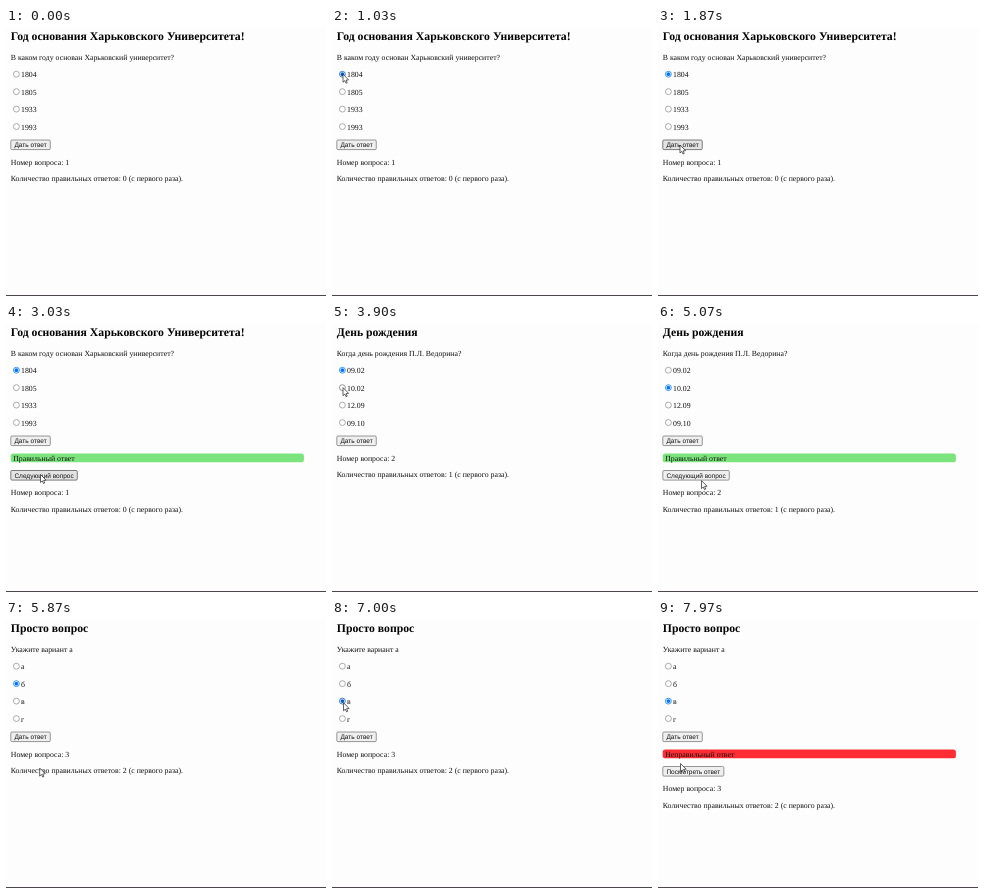
An HTML page with a canvas for the animation above (8 s loop, 320 px wide and 268 px high).

```html
<!DOCTYPE html>
<html lang="ru">
<head>
<meta charset="utf-8">
<title>Тест</title>
<style>
  html, body { margin: 0; width: 100%; height: 100%; overflow: hidden; background: #fefdfe; }
  canvas { display: block; width: 320px; height: 268px; }
</style>
</head>
<body>
<canvas id="stage" width="320" height="268"></canvas>
<script>
const ctx = document.getElementById('stage').getContext('2d');
const LOOP = 8000;
const SCALE = 0.488;
const SERIF = '"Liberation Serif", "Times New Roman", serif';
const SANS = '"Liberation Sans", Arial, sans-serif';
const BODY = `${16 * SCALE}px ${SERIF}`;
const HEADING = `bold ${24 * SCALE}px ${SERIF}`;
const LABEL = `${13.333 * SCALE}px ${SANS}`;
const LEFT = 4.8;
const RADIO_X = 10.4;
const rowY = i => 46.2 + i * 17.45;

const RIGHT = { text: 'Правильный ответ', color: '#7ce47c', next: 'Следующий вопрос' };
const WRONG = { text: 'Неправильный ответ', color: '#ff2c33', next: 'Посмотреть ответ' };

const questions = [
  { title: 'Год основания Харьковского Университета!',
    text: 'В каком году основан Харьковский университет?',
    options: ['1804', '1805', '1933', '1993'], result: RIGHT },
  { title: 'День рождения',
    text: 'Когда день рождения П.Л. Ведорина?',
    options: ['09.02', '10.02', '12.09', '09.10'], result: RIGHT },
  { title: 'Просто вопрос',
    text: 'Укажите вариант а',
    options: ['а', 'б', 'в', 'г'], result: WRONG }
];

// Each step: when it happens, where the pointer is, and what it changes.
const pick = (at, i) => ({ at, x: 11, y: rowY(i), change: { chosen: i } });
const answer = at => ({ at, x: 22, y: 117, change: { answered: true } });
const next = (at, index) => ({ at, x: 34.5, y: 150.5, change: { index, answered: false } });
const rest = (at, x, y) => ({ at, x, y, change: {} });

const steps = [
  rest(0, 221, 268),
  pick(1000, 0), answer(2070), next(3230, 1),
  pick(4070, 1), answer(4670), rest(5270, 43.5, 156.6), next(5600, 2),
  pick(6870, 2), answer(7670), rest(8150, 22.5, 143.5)
];

const SETTLE = 200, LEAVE = 60, TRAVEL = 900;

function pointerAt(t) {
  if (t < 70) return null;
  const i = steps.findIndex(s => s.at > t);
  const from = steps[i - 1], to = steps[i];
  const end = to.at - SETTLE;
  const start = Math.max(from.at + LEAVE, end - TRAVEL);
  const k = Math.min(1, Math.max(0, (t - start) / (end - start)));
  const e = k * k * (3 - 2 * k);
  return [from.x + (to.x - from.x) * e, from.y + (to.y - from.y) * e];
}

function stateAt(t) {
  const done = steps.filter(s => s.at <= t).map(s => s.change);
  return Object.assign({ index: 0, chosen: -1, answered: false }, ...done);
}

function write(text, x, y, font = BODY, color = '#111') {
  ctx.font = font;
  ctx.fillStyle = color;
  ctx.fillText(text, x, y);
}

function circle(x, y, r) {
  ctx.beginPath();
  ctx.arc(x, y, r, 0, Math.PI * 2);
}

function box(x, y, w, h, r) {
  ctx.beginPath();
  ctx.roundRect(x, y, w, h, r);
}

function paint(fill, stroke, width) {
  ctx.fillStyle = fill;
  ctx.fill();
  ctx.lineWidth = width;
  ctx.strokeStyle = stroke;
  ctx.stroke();
}

function radio(y, checked, pointer) {
  const hover = pointer && Math.hypot(pointer[0] - RADIO_X, pointer[1] - y) < 3.4;
  const color = checked ? (hover ? '#005cc8' : '#0075ff') : (hover ? '#4f4f4f' : '#767676');
  circle(RADIO_X, y, 2.95);
  paint('#fff', color, checked ? 0.75 : 0.6);
  if (checked) {
    circle(RADIO_X, y, 1.85);
    ctx.fillStyle = color;
    ctx.fill();
  }
}

function button(text, y, pointer) {
  const x = 4.5, h = 10.2;
  ctx.font = LABEL;
  const w = ctx.measureText(text).width + 16 * SCALE;
  const hover = pointer && pointer[0] > x && pointer[0] < x + w &&
    pointer[1] > y && pointer[1] < y + h;
  box(x + 0.3, y + 0.3, w - 0.6, h - 0.6, 1.2);
  paint(hover ? '#e3e3e3' : '#efefef', hover ? '#555' : '#767676', 0.75);
  write(text, x + 8 * SCALE, y + 7.4, LABEL);
}

function arrow([x, y]) {
  ctx.beginPath();
  ctx.moveTo(x, y);
  ctx.lineTo(x, y + 8);
  ctx.lineTo(x + 1.8, y + 6.4);
  ctx.lineTo(x + 3, y + 9);
  ctx.lineTo(x + 4.2, y + 8.5);
  ctx.lineTo(x + 3.1, y + 5.9);
  ctx.lineTo(x + 5.6, y + 5.7);
  ctx.closePath();
  ctx.lineJoin = 'round';
  paint('#fff', '#222', 0.7);
}

function draw(t) {
  const { index, chosen, answered } = stateAt(t);
  const { title, text, options, result } = questions[index];
  const pointer = pointerAt(t);

  ctx.fillStyle = '#fefdfe';
  ctx.fillRect(0, 0, 320, 268);
  ctx.fillStyle = '#4c464c';
  ctx.fillRect(0, 267, 320, 1);

  write(title, LEFT, 12.2, HEADING, '#000');
  write(text, LEFT, 31.9);
  options.forEach((option, i) => {
    radio(rowY(i), i === chosen, pointer);
    write(option, 15, rowY(i) + 3.1);
  });
  button('Дать ответ', 111.7, pointer);

  let y = 136.5;
  if (answered) {
    box(4.7, 129.4, 293.2, 8.9, 2.6);
    ctx.fillStyle = result.color;
    ctx.fill();
    write(result.text, 7.2, y);
    button(result.next, 146.2, pointer);
    y += 34.5;
  }
  write(`Номер вопроса: ${index + 1}`, LEFT, y);
  write(`Количество правильных ответов: ${index} (с первого раза).`, LEFT, y + 16.7);

  if (pointer) arrow(pointer);
}

ctx.textRendering = 'geometricPrecision';
const began = performance.now();
function tick() {
  draw((performance.now() - began) % LOOP);
  requestAnimationFrame(tick);
}
tick();
</script>
</body>
</html>
```
